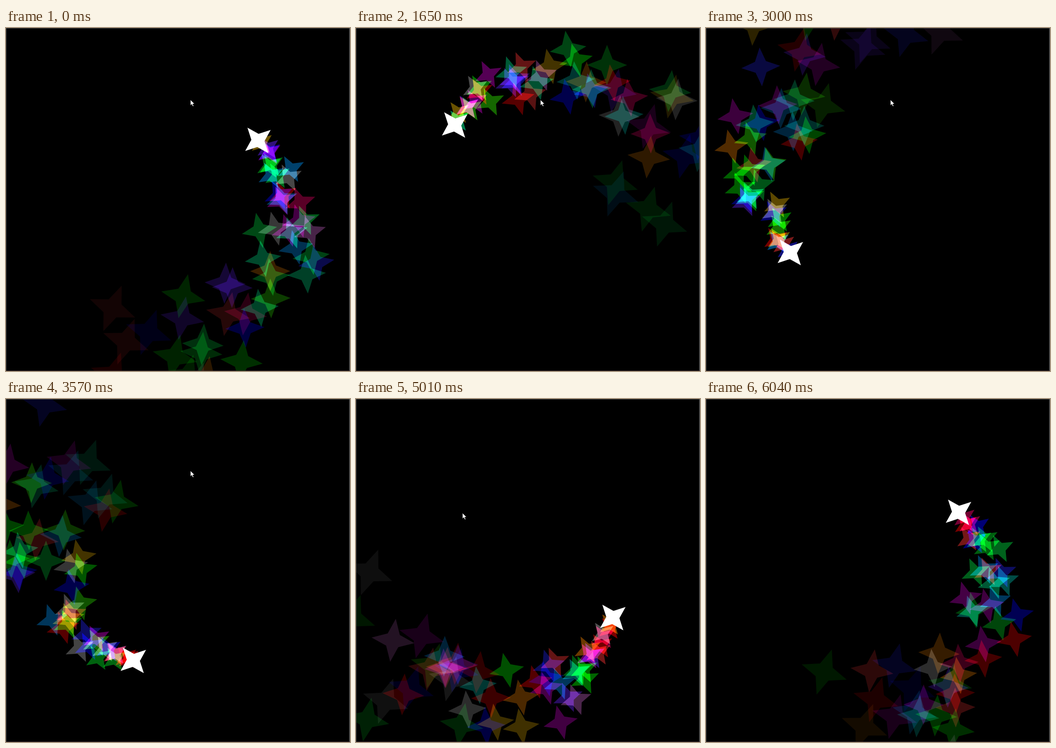
An HTML page with a canvas that plays this animation: 750x747 px, repeating every 6.06 s.

```html
<!DOCTYPE html>
<html lang="en">
<head>
<meta charset="utf-8">
<title>Star trail</title>
<style>
  html, body { margin: 0; width: 100%; height: 100%; overflow: hidden; background: #000; }
  canvas { display: block; width: 750px; height: 747px; }
</style>
</head>
<body>
<canvas id="stage" width="750" height="747"></canvas>
<script>
const W = 750, H = 747, RAD = Math.PI / 180;
const ctx = document.getElementById('stage').getContext('2d');

// How long each picture holds, in hundredths of a second.
const holds = [12, 15, 15, 12, 15, 13, 12, 14, 15, 12, 15, 15, 12, 15, 13, 14,
  14, 13, 14, 12, 13, 15, 15, 12, 15, 15, 12, 14, 13, 12, 13, 15, 12, 12, 14,
  12, 15, 12, 13, 12, 14, 12, 13, 12, 15, 2];
const LOOP = holds.reduce((sum, h) => sum + h, 0) * 10;

// Head of the trail: [time, degrees anticlockwise] on a circle.
const orbit = { x: 368, y: 369, r: 219.7 };
const angles = [[-2200, -96.5], [0, 34.4], [690, 76.5], [1650, 134.1],
  [3000, 213.1], [4210, 282.3], [5010, 330.9], [6040, 393.8]];

// Pointer: [time, x, y]; it is gone from pointerEnd on.
const pointer = [[0, 402, 156], [4480, 402, 156], [4600, 300, 212],
  [4860, 240, 240], [5010, 232, 248], [5130, 232, 248], [5380, 222, 209], [5520, 222, 209]];
const pointerEnd = 5520;

const START_TURN = -39.5, SPIN = 0.03;
const LIFE = 2050, SPACING = 41;
const tints = ['#f00', '#0f0', '#00f', '#f00', '#00f', '#0d2', '#f33', '#22f',
  '#0e4', '#3f0', '#0cb', '#09f', '#62f', '#c0c', '#f80', '#da0', '#e06', '#0f9',
  '#c6c', '#aaa'];

function sample(keys, t, column = 1) {
  let i = 1;
  while (i < keys.length - 1 && keys[i][0] < t) i++;
  const a = keys[i - 1], b = keys[i];
  const k = Math.min(1, (t - a[0]) / (b[0] - a[0]));
  return a[column] + (b[column] - a[column]) * k;
}

function headAt(t) {
  const a = sample(angles, t) * RAD, c = Math.cos(a), s = Math.sin(a);
  return { x: orbit.x + orbit.r * c, y: orbit.y - orbit.r * s, c, s };
}

function seeded(seed) {
  return () => {
    seed = (seed + 0x6D2B79F5) | 0;
    let n = Math.imul(seed ^ (seed >>> 15), 1 | seed);
    n = (n + Math.imul(n ^ (n >>> 7), 61 | n)) ^ n;
    return ((n ^ (n >>> 14)) >>> 0) / 4294967296;
  };
}

// Sparks drift outwards and a little behind the head, with a random spread.
const random = seeded(29);
const spread = () => (random() - 0.5) * 0.15;
const sparks = [];
for (let born = -LIFE; born < LOOP; born += SPACING) {
  const { x, y, c, s } = headAt(born);
  sparks.push({
    born, x, y,
    vx: 0.062 * c + 0.03 * s + spread(),
    vy: -0.062 * s + 0.03 * c + spread(),
    tint: tints[Math.floor(random() * tints.length)]
  });
}

function star(x, y, radius, turn, fill) {
  ctx.beginPath();
  for (let i = 0; i < 8; i++) {
    const a = (turn + i * 45) * RAD, r = i % 2 ? radius * 0.4 : radius;
    ctx.lineTo(x + r * Math.cos(a), y + r * Math.sin(a));
  }
  ctx.fillStyle = fill;
  ctx.fill();
}

function drawSpark(spark, t) {
  const age = t - spark.born;
  if (age <= 0 || age > LIFE) return;
  ctx.globalAlpha = 0.5 * (1 - age / 2400);
  star(spark.x + spark.vx * age, spark.y + spark.vy * age,
    27 + age * 0.0128, START_TURN + age * SPIN, spark.tint);
}

const arrow = new Path2D('M0 0V13L3 10.3L5.2 15L7.4 14L5.3 9.5H9.3Z');

function drawPointer(t) {
  if (t >= pointerEnd) return;
  ctx.save();
  ctx.translate(sample(pointer, t, 1), sample(pointer, t, 2));
  ctx.fillStyle = '#fff';
  ctx.strokeStyle = '#000';
  ctx.lineWidth = 1;
  ctx.fill(arrow);
  ctx.stroke(arrow);
  ctx.restore();
}

function drawEdges() {
  ctx.fillStyle = '#4a4a4a';
  ctx.fillRect(0, 0, W, 1);
  ctx.fillRect(0, 0, 1, H);
  ctx.fillRect(748, 0, 2, H);
  ctx.fillStyle = '#3c2a2e';
  ctx.fillRect(0, 746, W, 1);
}

function draw(t) {
  ctx.fillStyle = '#000';
  ctx.fillRect(0, 0, W, H);
  ctx.globalCompositeOperation = 'lighter';
  sparks.forEach(spark => drawSpark(spark, t));
  ctx.globalCompositeOperation = 'source-over';
  ctx.globalAlpha = 1;
  const head = headAt(t);
  star(head.x, head.y, 36, START_TURN, '#fff');
  drawPointer(t);
  drawEdges();
}

function heldTime(t) {
  let begin = 0;
  for (const hold of holds) {
    if (t < begin + hold * 10) return begin;
    begin += hold * 10;
  }
  return 0;
}

const started = performance.now();
let shown = -1;
function tick() {
  const t = heldTime((performance.now() - started) % LOOP);
  if (t !== shown) draw(shown = t);
  requestAnimationFrame(tick);
}
tick();
</script>
</body>
</html>
```
